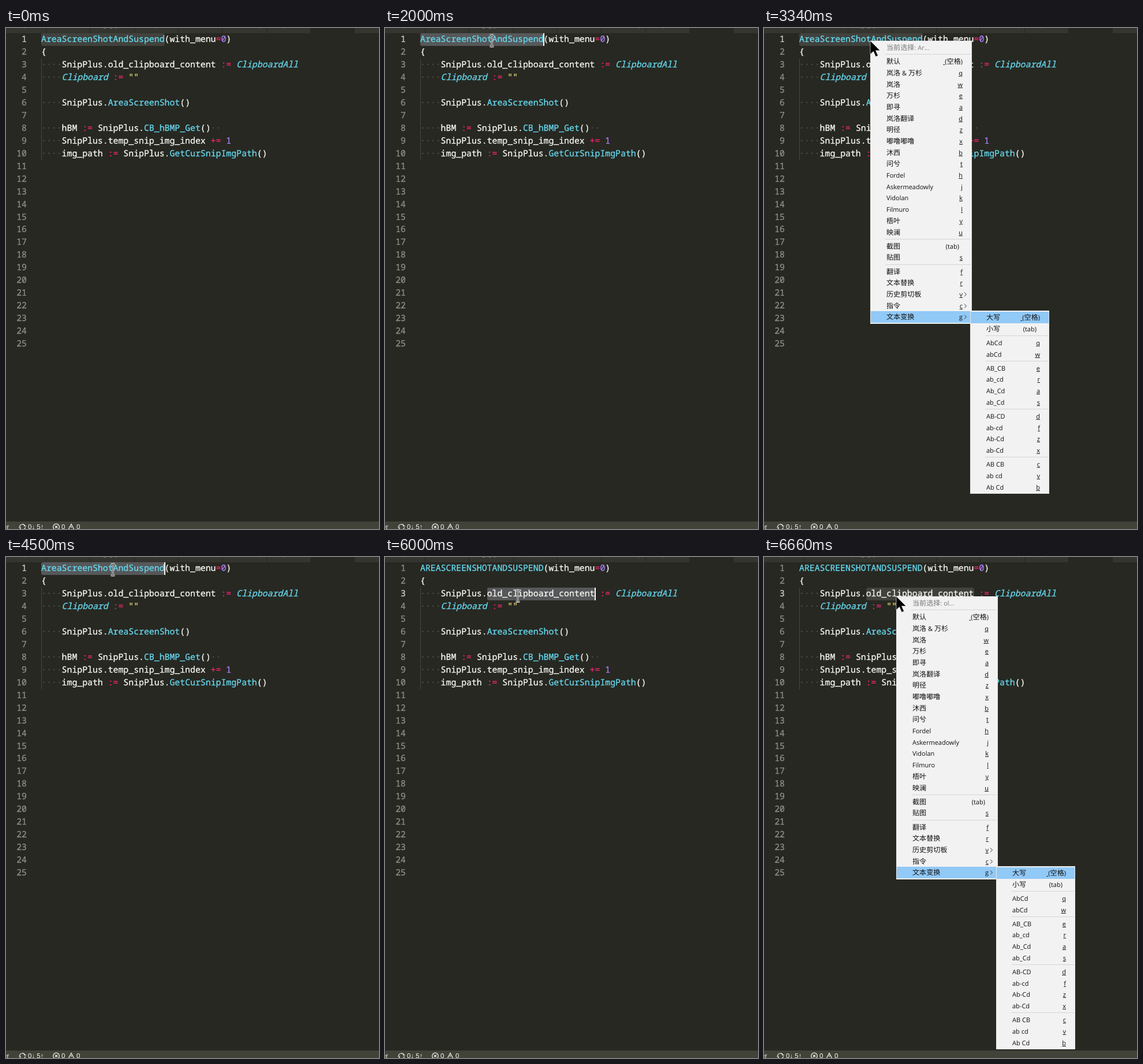
An HTML page that plays this animation: 646x867 px, repeating every 8 s.

```html
<!DOCTYPE html>
<html lang="zh-CN">
<head>
<meta charset="utf-8">
<title>Text case menu</title>
<style>
html, body { margin: 0; width: 100%; height: 100%; overflow: hidden; background: #272822; }
body { position: relative; text-rendering: geometricPrecision; }
body > *, #code > *, #tabs > *, #status > * { position: absolute; }
[hidden] { display: none !important; }

#tabs { left: 0; top: 0; width: 100%; height: 9px; overflow: hidden; background: #34352f;
  font: 11px/14px "Open Sans", sans-serif; color: #b4b4ae; }
#tabs p { top: 0; width: 1px; height: 9px; margin: 0; background: #272822; }
#tabs p.open { width: 77px; }
#tabs span { top: -12px; }

#code { left: 0; top: 0; font: 14.83px/21.95px "Noto Sans Mono", monospace; color: #f8f8f2; white-space: pre;
  -webkit-text-stroke: .3px; }
#code .num { width: 36px; text-align: right; color: #90908a; }
#code .num.on { color: #d0d0cc; }
#code .row { left: 61px; }
.row b { font-weight: 400; color: #f92672; }
.row a, .row i { color: #66d9ef; }
.row em { font-style: normal; color: #ae81ff; }
.row s { text-decoration: none; color: #e6db74; }
.row u { text-decoration: none; color: #54554e; }
#guide { left: 61px; top: 53px; width: 1px; height: 176px; }
#sel { height: 21.5px; border-radius: 3px; }
#caret { width: 2px; height: 21.5px; background: #f8f8f0; }
#line { left: 61px; right: 0; height: 22px; background: #3e3d32; }

#status { left: 0; bottom: 0; width: 100%; height: 13px; overflow: hidden; background: #414339;
  font: 11.5px/14px "Liberation Sans", sans-serif; color: #f8f8f2; white-space: pre; }
#status span { top: 3px; }
#status svg { left: 0; top: -1px; fill: none; stroke: #f8f8f2; stroke-width: 1.2; }

.menu { box-sizing: border-box; padding: 1px 0; border: 1px solid #e6e6e6; background: #f2f2f2; color: #111;
  font: 12.1px/19.7px "Open Sans", "Noto Sans CJK SC", "Noto Sans CJK JP", sans-serif; white-space: pre; }
.menu div { position: relative; height: 19.7px; padding-left: 27px; }
.menu small { font-size: 11px; line-height: 1; }
.menu hr { height: 1px; margin: 1.5px 1px 2px 25px; border: 0; background: #d5d5d5; }
.menu div.off { color: #777; }
.menu div.hot { background: #91c9f7; }
.menu kbd { position: absolute; top: 0; right: 15px; font: inherit; }
.menu .tab { right: 21px; }
.menu svg { position: absolute; right: 7px; top: 6px; fill: none; stroke: #333; }
#main { width: 176px; height: 490px; }
#sub { width: 137px; height: 317px; }
#cursor { left: 0; top: 0; overflow: visible; }
</style>
</head>
<body>
<div id="tabs"></div>
<div id="line"></div>
<div id="sel"></div>
<div id="guide"></div>
<div id="code"></div>
<div id="caret"></div>
<div id="status">
  <span style="left:-5px">er</span><span style="left:38px">0↓ 5↑</span>
  <span style="left:96px">0</span><span style="left:122px">0</span>
  <svg width="140" height="14">
    <path d="M23.5 10A5 5 0 0 1 33 9M33.5 11A5 5 0 0 1 24 12M31 9h4M22 11h4"/>
    <circle cx="87" cy="10.5" r="5.3"/><path d="M85 8.5l4 4m0-4l-4 4"/>
    <path d="M113 5.5l5 9.5h-10zM113 9v3"/>
  </svg>
</div>
<div id="main" class="menu"></div>
<div id="sub" class="menu"></div>
<svg id="cursor" width="1" height="1">
  <defs><path id="bar" d="M-3.5-10h2.500l1 1l1-1h2.500M0-9V9M-3.500 10h2.500l1-1l1 1h2.500"/></defs>
  <g id="beam" fill="none">
    <use href="#bar" stroke="#f0f0f0" stroke-width="2.8"/>
    <use href="#bar" stroke="#1a1a1a"/>
  </g>
  <circle id="ring" r="9.5" fill="none" stroke="#3aa0dc" stroke-width="3.5"/>
  <path id="arrow" d="M0 0V23.5L5.5 18.5L9.5 27.5L13.5 26L9.5 17H17z" stroke="#fff" stroke-width=".6"/>
</svg>
<script>
const $ = id => document.getElementById(id);
const LOOP = 8000, LEFT = 61, TOP = 9.2, PITCH = 21.95, CHAR = 8.898;
const rowTop = row => TOP + (row - 1) * PITCH + 'px';

const dots = '<u>····</u>';
const code = [
  '<a id="func"></a>(with_menu<b>=</b><em>0</em>)',
  '{',
  dots + 'SnipPlus.old_clipboard_content <b>:=</b> <i>ClipboardAll</i>',
  dots + '<i>Clipboard</i> <b>:=</b> <s>""</s>',
  '',
  dots + 'SnipPlus.<a>AreaScreenShot</a>()',
  '',
  dots + 'hBM <b>:=</b> SnipPlus.<a>CB_hBMP_Get</a>()<u>··</u>',
  dots + 'SnipPlus.temp_snip_img_index <b>+=</b> <em>1</em>',
  dots + 'img_path <b>:=</b> SnipPlus.<a>GetCurSnipImgPath</a>()'
];
for (let n = 1; n <= 25; n++) {
  const style = `style="top:${rowTop(n)}"`;
  $('code').innerHTML += `<div class="num" ${style}>${n}</div><div class="row" ${style}>${code[n - 1] || ''}</div>`;
}
const nums = document.querySelectorAll('.num');

// Tab strip: only the descenders of the labels reach into view
const tails = [[30, 'p'], [168, 'g'], [179, 'g'], [190, 'j'], [260, 'p'], [439, 'p'], [480, 'p']];
$('tabs').innerHTML = [69, 145, 222, 298, 374, 451].map(x => `<p style="left:${x}px"></p>`).join('') +
  '<p class="open" style="left:527px"></p>' +
  tails.map(([x, c]) => `<span style="left:${x}px">${c}</span>`).join('');

// Latin runs are set a little smaller than the Chinese text
const mixed = s => s.replace(/[ -~]+/g, '<small>$&</small>');
const chevron = '<svg width="6" height="8"><path d="M1 .5l3.5 3.5L1 7.5"/></svg>';

function item(entry) {
  if (entry === '-') return '<hr>';
  const [label, key, more] = entry.split('|');
  const hint = key === '_' ? '<small><u> </u>(</small>空格<small>)</small>'
    : key === 'tab' ? '<small>(tab)</small>' : `<small><u>${key}</u></small>`;
  return `<div>${mixed(label)}<kbd class="${key}">${hint}</kbd>${more ? chevron : ''}</div>`;
}
const fill = (id, list) => { $(id).innerHTML += list.split(',').map(item).join(''); };

$('main').innerHTML = '<div class="off" id="head"></div>';
fill('main', '-,默认|_,岚洛 & 万杉|q,岚洛|w,万杉|e,即寻|a,岚洛翻译|d,明径|z,嘟噜嘟噜|x,沐西|b,问兮|t,' +
  'Fordel|h,Askermeadowly|j,Vidolan|k,Filmuro|l,梧叶|y,映澜|u,-,截图|tab,贴图|s,-,' +
  '翻译|f,文本替换|r,历史剪切板|v|1,指令|c|1,文本变换|g|1');
fill('sub', '大写|_,小写|tab,-,AbCd|q,abCd|w,-,AB_CB|e,ab_cd|r,Ab_Cd|a,ab_Cd|s,-,' +
  'AB-CD|d,ab-cd|f,Ab-Cd|z,ab-Cd|x,-,AB CB|c,ab cd|v,Ab Cd|b');
const last = $('main').lastElementChild;
$('sub').firstElementChild.className = 'hot';

const DIM = '#41423d', LIT = '#56585a';
const word1 = [1, 0, 24], word3 = [3, 13, 34];

// Each step changes part of the state; caret is [row, x], sel is [row, from, to]
const steps = [
  [0, { row: 1, sel: word1, tint: DIM, name: 'AreaScreenShotAndSuspend' }],
  [490, { cursor: ['beam', 405, 225] }],
  [820, { cursor: ['beam', 215, 54] }],
  [990, { cursor: ['beam', 208, 50] }],
  [1160, { cursor: ['beam', 185, 24] }],
  [1330, { cursor: ['beam', 185, 22] }],
  [1500, { cursor: ['ring', 183.5, 21.5] }],
  [1670, { tint: LIT, caret: [1, 185] }],
  [1840, { caret: [1, 273.5] }],
  [2000, { cursor: ['beam', 185, 22] }],
  [2340, { cursor: ['arrow', 184, 22], tint: DIM, caret: null, menu: [184, 22, 'Ar'] }],
  [3340, { sub: true }],
  [4500, { cursor: ['beam', 185, 22], tint: LIT, caret: [1, 273.5], menu: null, sub: false }],
  [4670, { name: 'AREASCREENSHOTANDSUSPEND', sel: null, line: 1 }],
  [5160, { cursor: ['beam', 222, 61], caret: null }],
  [5330, { cursor: ['beam', 230, 68] }],
  [5660, { cursor: ['ring', 229, 67], caret: [3, 230], row: 3, line: 3, guide: true }],
  [5830, { sel: word3, caret: [3, 363], line: 0, guide: false }],
  [6000, { cursor: ['beam', 230, 67.5] }],
  [6330, { cursor: ['arrow', 229, 68], tint: DIM, menu: [229, 68, 'ol'] }],
  [6500, { caret: null }],
  [6660, { sub: true }]
];

function place(id, shown, style) {
  $(id).toggleAttribute('hidden', !shown);
  if (shown) Object.assign($(id).style, style());
}

function draw(t) {
  const s = Object.assign({}, ...steps.filter(([at]) => at <= t).map(([, change]) => change));
  $('func').textContent = s.name;
  nums.forEach((el, i) => el.classList.toggle('on', i + 1 === s.row));
  $('guide').style.background = s.guide ? '#767771' : '#464741';
  place('line', s.line, () => ({ top: rowTop(s.line) }));
  place('sel', s.sel, () => ({
    top: rowTop(s.sel[0]), left: LEFT + s.sel[1] * CHAR + 'px',
    width: (s.sel[2] - s.sel[1]) * CHAR + 'px', background: s.tint
  }));
  place('caret', s.caret, () => ({ top: rowTop(s.caret[0]), left: s.caret[1] + 'px' }));
  place('main', s.menu, () => ({ left: s.menu[0] + 'px', top: s.menu[1] + 'px' }));
  place('sub', s.sub, () => ({ left: s.menu[0] + 173 + 'px', top: s.menu[1] + 467 + 'px' }));
  if (s.menu) $('head').innerHTML = mixed(`当前选择: ${s.menu[2]}...`);
  last.className = s.sub ? 'hot' : '';
  const [kind, x, y] = s.cursor || [];
  for (const id of ['beam', 'ring', 'arrow']) $(id).toggleAttribute('hidden', id !== kind);
  if (kind) $(kind).setAttribute('transform', `translate(${x} ${y})`);
}

let shown = -1;
function tick() {
  const t = performance.now() % LOOP;
  const now = steps.filter(([at]) => at <= t).length;
  if (now !== shown) draw(t);
  shown = now;
  requestAnimationFrame(tick);
}
tick();
</script>
</body>
</html>
```
